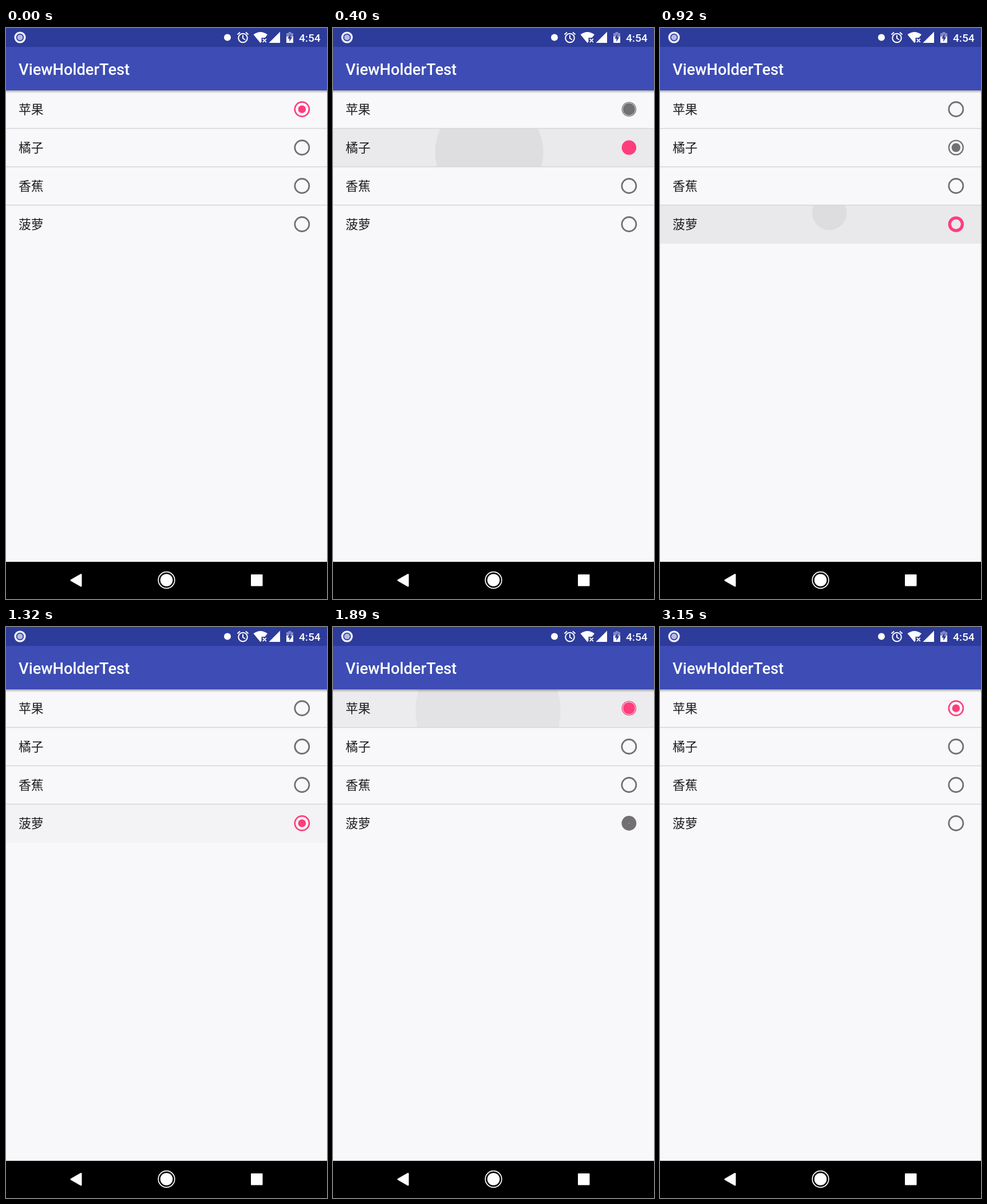
Animation of 561x998 px, one loop 3860 ms. Source, as an HTML page:

```html
<!DOCTYPE html>
<html lang="zh-CN">
<head>
<meta charset="utf-8">
<title>ViewHolderTest</title>
<style>
  html, body { margin: 0; width: 100%; height: 100%; overflow: hidden; background: #f8f7fa; }
  svg { display: block; width: 561px; height: 998px; }
  .bar { font-family: Roboto, sans-serif; font-weight: 500; fill: #fff; }
  .row { font: 21.8px "Noto Sans CJK SC", "Noto Sans CJK", sans-serif; fill: #1c1b1f; }
</style>
</head>
<body>
<svg viewBox="0 0 561 998">
  <defs>
    <linearGradient id="shade" x2="0" y2="1">
      <stop offset="0" stop-color="#000" stop-opacity=".3"/>
      <stop offset="1" stop-color="#000" stop-opacity="0"/>
    </linearGradient>
  </defs>
  <rect width="561" height="998" fill="#f8f7fa"/>
  <g id="list"></g>
  <rect y="109" width="561" height="5" fill="url(#shade)"/>
  <rect y="33" width="561" height="76" fill="#3d4db5"/>
  <rect width="561" height="33" fill="#2d3b9a"/>
  <text class="bar" x="22" y="81.5" font-size="27.28">ViewHolderTest</text>
  <text class="bar" x="512" y="24" font-size="19.1">4:54</text>

  <!-- status icons -->
  <circle cx="24.5" cy="16.5" r="8.4" fill="none" stroke="#f4f4fd" stroke-width="3.4"/>
  <circle cx="24.5" cy="16.5" r="5" fill="#b4bae4"/>
  <circle cx="387" cy="16.5" r="6" fill="#fff"/>
  <g fill="none" stroke="#fff" stroke-width="2">
    <circle cx="414" cy="17.5" r="7.8"/>
    <path d="M414 12.5v5.5l4 2.5M404.5 11.5l4.5-4M423.5 11.5l-4.5-4"/>
    <path d="M448.8 18.8l6 6m0-6l-6 6" stroke-width="1.8"/>
  </g>
  <g fill="#fff">
    <path d="M432.5 11.5Q444.5 2.500 457 11.500L452.500 17H446.500V24L444.700 26.200Z"/>
    <path d="M479 6.500V26H459.500Z"/>
    <path d="M490 9h3.500V7h5V9H502V15H490Z" opacity=".4"/>
    <path d="M490 15H502V26H490Z"/>
  </g>
  <path d="M497.200 10.500L492 18.500H495.300V24L500.300 15.800H497.200Z" fill="#2d3b9a"/>

  <!-- navigation bar -->
  <rect y="933" width="561" height="65" fill="#000"/>
  <g fill="#fff" stroke="#fff" stroke-linejoin="round">
    <path d="M114 965.200L131 955.500V975Z" stroke-width="3"/>
    <circle cx="280.500" cy="965" r="10.800" stroke="none"/>
    <circle cx="280.500" cy="965" r="14.300" fill="none" stroke-width="1.700"/>
    <rect x="429" y="956" width="18.500" height="18.500" stroke-width="2"/>
  </g>
</svg>
<script>
const LOOP = 3860, SPAN = 450, MID = 0.43;
const PINK = '#ff3d7b', GRAY = '#727072';
const names = ['苹果', '橘子', '香蕉', '菠萝'];
const taps = [
  { row: 1, from: 0, press: 210, check: 210, x: 273, y: 217 },
  { row: 3, from: 1, press: 860, check: 875, x: 296, y: 323 },
  { row: 0, from: 3, press: 1635, check: 1685, x: 271, y: 146 }
];

const clamp = v => Math.max(0, Math.min(1, v));
const mix = (a, b, k) => a + (b - a) * k;

function add(parent, tag, attrs) {
  const el = document.createElementNS('http://www.w3.org/2000/svg', tag);
  set(el, attrs);
  return parent.appendChild(el);
}
function set(el, attrs) {
  for (const k in attrs) el.setAttribute(k, attrs[k]);
}

const list = document.getElementById('list');
const rows = names.map((name, i) => {
  const top = 109 + 67 * i, cy = 142 + 67 * i;
  const clip = add(list, 'clipPath', { id: 'row' + i });
  add(clip, 'rect', { y: top, width: 561, height: 67 });
  const glow = add(list, 'rect', { y: top, width: 561, height: 67 });
  const wave = add(list, 'circle', { 'clip-path': `url(#row${i})` });
  if (i) add(list, 'rect', { y: top - 1.2, width: 561, height: 1.5, fill: '#d5d4d8' });
  add(list, 'text', { class: 'row', x: 22, y: cy + 8.2 }).textContent = name;
  const ring = add(list, 'circle', { cx: 517.3, cy, fill: 'none' });
  const dot = add(list, 'circle', { cx: 517.3, cy });
  return { glow, wave, ring, dot };
});

// s: -1 empty ring, 0 solid disc, 1 ring with dot
function drawRadio({ ring, dot }, s, color) {
  const open = s <= 0;
  const outer = open ? mix(12.6, 13.9, Math.sqrt(-s)) : mix(12.7, 13.9, s);
  const inner = open ? 11.1 * -s : mix(11.4, 11.2, s);
  set(ring, { r: (outer + inner) / 2, 'stroke-width': outer - inner, stroke: color });
  set(dot, { r: open ? 0 : mix(10.7, 6.8, s), fill: color });
}

function drawRipple({ glow, wave }, tap, age) {
  const fade = age < 190 ? clamp(age / 60) : clamp((600 - age) / 410);
  set(glow, { 'fill-opacity': age > 0 ? 0.057 * fade : 0 });
  set(wave, {
    cx: tap.x, cy: tap.y, r: Math.max(0, age * 0.495),
    'fill-opacity': age > 0 ? 0.052 * clamp((400 - age) / 200) : 0
  });
}

function draw(t) {
  const state = names.map((_, i) => i ? [-1, GRAY] : [1, PINK]);
  for (const tap of taps) {
    const p = clamp((t - tap.check) / SPAN);
    if (p > 0) {
      const s = p < MID ? p / MID - 1 : (p - MID) / (1 - MID);
      state[tap.row] = [s, PINK];
      state[tap.from] = [-s, GRAY];
    }
    drawRipple(rows[tap.row], tap, t - tap.press);
  }
  rows.forEach((row, i) => drawRadio(row, ...state[i]));
}

set(rows[2].glow, { 'fill-opacity': 0 });
const start = performance.now();
function tick() {
  draw((performance.now() - start) % LOOP);
  requestAnimationFrame(tick);
}
tick();
</script>
</body>
</html>
```
